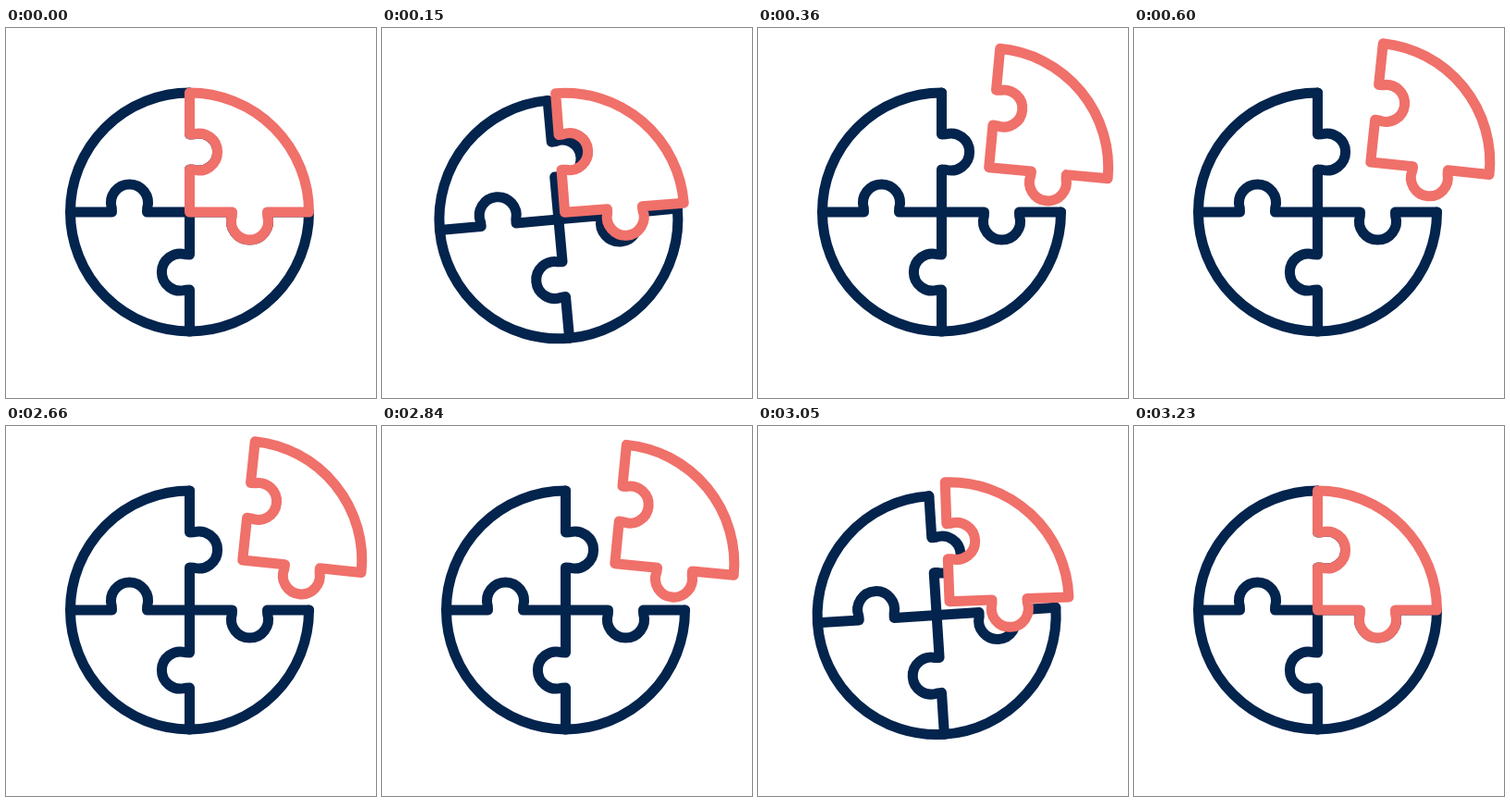
Recreate the animation shown at these times as an HTML page without scripts. Size 400 px wide and 400 px high, loop 4.26 s.

```html
<!DOCTYPE html>
<html lang="en">
<head>
<meta charset="utf-8">
<title>Puzzle circle</title>
<style>
  /* --u: position along the move in ms, 0 = joined, 600 = piece fully out */
  @property --u {
    syntax: "<number>";
    inherits: true;
    initial-value: 0;
  }

  html, body {
    margin: 0;
    width: 100%;
    height: 100%;
    overflow: hidden;
    background: #fff;
  }

  svg {
    display: block;
    width: 100%;
    height: 100%;
    fill: none;
    stroke: #03244d;
    stroke-width: 11;
    stroke-linecap: round;
    stroke-linejoin: round;
    animation: move 4260ms infinite;
  }

  /* out in 30 ms ticks, hold, the same way back, hold */
  @keyframes move {
    0% { --u: 0; animation-timing-function: steps(20, end); }
    14.0845% { --u: 600; animation-timing-function: step-end; }
    62.4413% { --u: 600; animation-timing-function: steps(20, start); }
    76.5258%, 100% { --u: 0; }
  }

  /* the whole circle recoils, peaking at 100 ms and settled by 275 ms */
  .puzzle {
    --m: clamp(0, min(var(--u) / 100, (275 - var(--u)) / 175), 1);
    --recoil: (var(--m) * var(--m) * (3 - 2 * var(--m)));
    transform:
      translate(calc(var(--recoil) * -9.5px), calc(var(--recoil) * 9.8px))
      rotate(calc(var(--recoil) * -6.5deg));
  }

  /* the piece leaves quickly and slows down for a long time */
  .piece {
    --x: clamp(0, (var(--u) - 80) / 520, 1);
    --sq: (var(--x) * var(--x));
    --out: (var(--sq) / (var(--sq) + .163 * (1 - var(--x)) * (1 - var(--x))));
    fill: #fff;
    stroke: #f0706a;
    transform:
      translate(calc(var(--out) * 57.3px), calc(var(--out) * -54px))
      rotate(calc(var(--out) * 6deg));
  }
</style>
</head>
<body>
<svg viewBox="0 0 400 400">
  <defs>
    <path id="edge" d="M0 0V-46L4.5 -45.8A20 20 0 1 0 4.5 -84.2L0 -84V-129"/>
  </defs>
  <g transform="translate(198.5 199)">
    <g class="puzzle">
      <path d="M0 -129A129 129 0 1 0 129 0"/>
      <use href="#edge"/>
      <use href="#edge" transform="rotate(90)"/>
      <use href="#edge" transform="rotate(180)"/>
      <use href="#edge" transform="rotate(270)"/>
      <path class="piece" d="M0 0V-46L4.5 -45.8A20 20 0 1 0 4.5 -84.2L0 -84V-129A129 129 0 0 1 129 0H84L84.2 4.5A20 20 0 1 1 45.8 4.5L46 0Z"/>
    </g>
  </g>
</svg>
</body>
</html>
```
